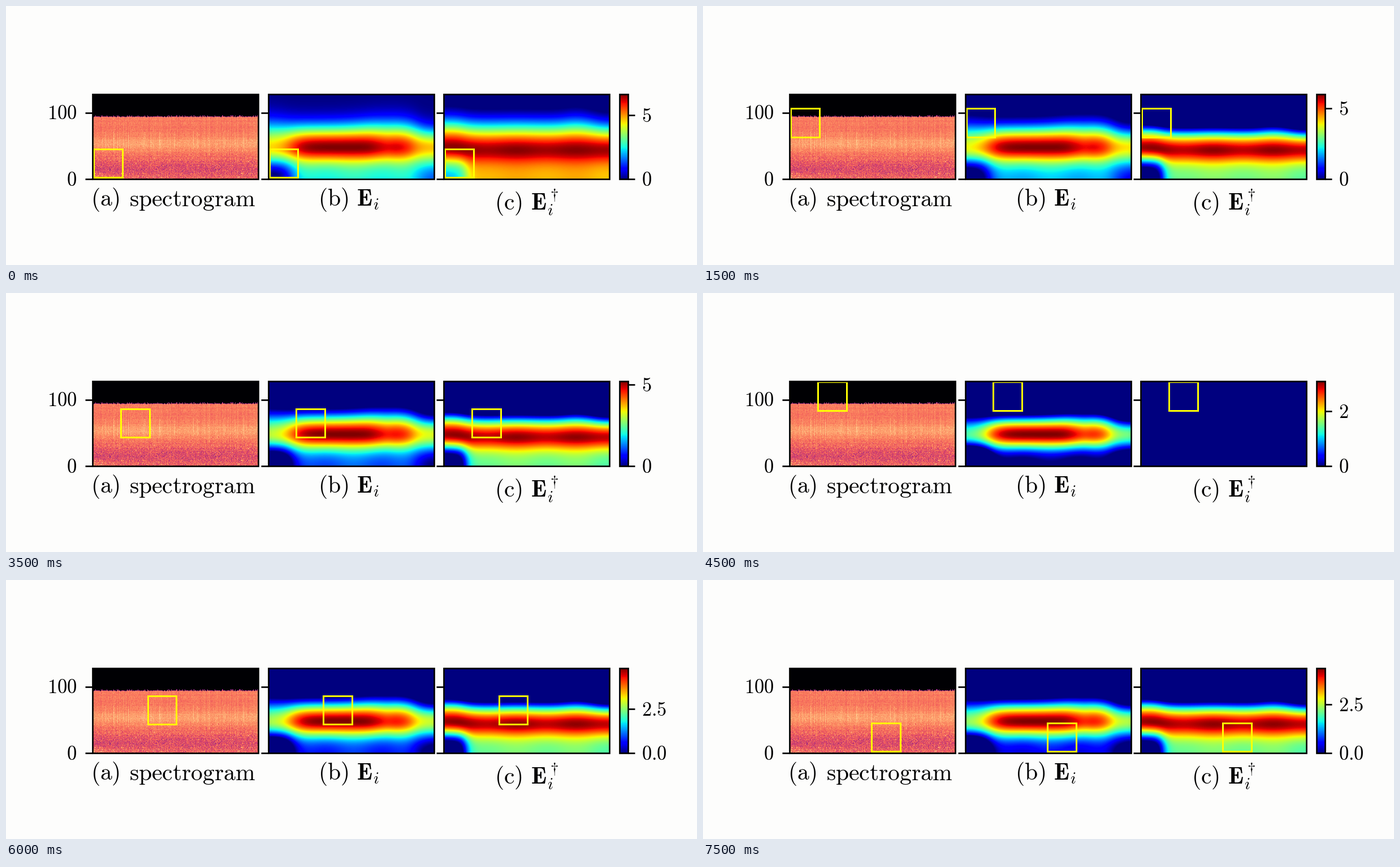
Animation, 1222 px wide and 458 px high, one loop 8 s. Source, as a matplotlib script:

```python
import matplotlib.pyplot as plt
import numpy as np
from matplotlib.animation import FuncAnimation
from matplotlib.patches import Rectangle

W, H, DPI = 1222, 458, 100
PT = 72 / DPI
LEFTS = (153, 463.5, 774)
PW, TOP, BOTTOM = 293, 156, 306
BAR_X, BAR_W = 1085.3, 15
STEPS, ROWS = 16, 5
TICK_PX, CAPTION_PX = 34.6, 41.5

plt.rcParams["mathtext.fontset"] = "cm"

u = (np.arange(PW) + .5) / PW
y = np.arange(TOP, BOTTOM)[:, None] + .5


def after(x, x0, w):
    """Soft step from 0 to 1 at x0."""
    return 1 / (1 + np.exp((x0 - x) / w))


def before(x, x0, w):
    return 1 - after(x, x0, w)


def bump(x, x0, w):
    return np.exp(-((x - x0) / w) ** 2 / 2)


def band(centre, ridge, above, below, spread_up, spread_down):
    """Horizontal ridge falling off to a plateau on either side."""
    plateau = np.where(y < centre, above, below)
    spread = np.where(y < centre, spread_up, spread_down)
    return plateau + (ridge - plateau) * bump(y, centre, spread)


def field_b():
    left, right = before(u, .1, .04), after(u, .91, .025)
    ridge = (1 - .58 * before(u, .14, .04) - .12 * after(u, .64, .025)
             - .4 * after(u, .87, .03) - .03 * bump(u, .72, .03))
    below = (-.06 - .85 * before(u, .13, .035) - .32 * after(u, .9, .035)
             - .03 * np.cos(6 * np.pi * (u - .68)))
    spread_up = 26 + 5 * left - 4 * right + 3 * bump(u, .74, .15)
    return band(250, ridge, -.72, below, spread_up, 18.5 + 5 * left + 3 * right)


def field_c():
    left = before(u, .12, .03)
    wave = np.cos(2 * np.pi * (u - .8) / .36)
    below = .49 - .79 * before(u, .13, .022) - .03 * after(u, .9, .03) + .015 * wave
    spread_up = 33.5 + 1.5 * bump(u, .8, .06) - 3 * after(u, .92, .03)
    return band(255 - 5 * left, .965 + .02 * wave, -1, below, spread_up, 16 + 4 * left)


def spectrogram():
    rng = np.random.default_rng(4)
    r = np.arange(128)[:, None]
    x = np.arange(PW)
    img = .72 + .09 * bump(r, 53, 7) - .12 * bump(r, 15, 10)
    img = img + .1 * before(r, 7, 1) * np.exp(-x / 25)
    img += (.025 + .05 * before(r, 32, 6)) * rng.normal(size=(128, PW))
    img += .012 * rng.normal(size=PW) + .008 * rng.normal(size=(128, 1))
    img[45:72, rng.choice(PW, 14)] += .06
    edge = 95 + (rng.random(PW) > .8) - (rng.random(PW) > .8)
    img[r == edge - 1] = .42
    img[r >= edge] = 0
    return np.clip(img, 0, 1)[::-1]


fig = plt.figure(figsize=(W / DPI, H / DPI), dpi=DPI, facecolor="#fdfdfc")
ax = fig.add_axes([0, 0, 1, 1])
ax.axis("off")


def picture(data, x, w, cmap):
    return ax.imshow(data, cmap=cmap, vmin=0, vmax=1, aspect="auto",
                     extent=(x, x + w, BOTTOM, TOP), interpolation="nearest")


def frame(x, w):
    ax.add_patch(Rectangle((x, TOP), w, BOTTOM - TOP, fill=False, ec="black",
                           lw=2.7 * PT, zorder=4))


def tick(x, y, length):
    return ax.plot([x, x + length], [y, y], color="black", lw=2.7 * PT,
                   solid_capstyle="butt", zorder=4)[0]


def label(x, y, text, px=TICK_PX, ha="left"):
    return ax.text(x, y, f"${text}$", fontsize=px * PT, ha=ha, va="baseline")


def caption(x, y, tag, body_x, body):
    label(x, y, rf"\mathrm{{({tag})}}", CAPTION_PX)
    label(body_x, y, body, CAPTION_PX)


B, C = field_b(), field_c()
picture(spectrogram(), LEFTS[0], PW, "magma")
img_b = picture(B, LEFTS[1], PW, "jet")
img_c = picture(C, LEFTS[2], PW, "jet")
picture(np.linspace(1, 0, 256)[:, None], BAR_X, BAR_W, "jet")

boxes = []
for left in LEFTS:
    frame(left, PW)
    for level in (188.5, BOTTOM):
        tick(left, level, -13)
    box = Rectangle((0, 0), 50.8, 50.3, fill=False, ec="#ffff00", lw=3 * PT, zorder=3)
    boxes.append(ax.add_patch(box))
frame(BAR_X, BAR_W)
tick(BAR_X + BAR_W, BOTTOM, 12)

label(125, 200, "100", ha="right")
label(125, 318, "0", ha="right")
caption(150.5, 353.5, "a", 217.5, r"\mathrm{spectrogram}")
caption(552.5, 353.5, "b", 620.5, r"\mathbf{E}_i")
caption(863.5, 360, "c", 927.5, r"\mathbf{E}_i^\dagger")

bar_tick = tick(BAR_X + BAR_W, TOP, 12)
bar_zero = label(1123.5, 318, "0")
bar_text = label(1123.5, 0, "5")

ax.set_xlim(0, W)
ax.set_ylim(H, 0)


def colour_limit(k):
    return np.interp(k, [0, 1, 3, 5, 7, 9, 10, 12, 15],
                     [6.64, 4.9, 6, 4.03, 5.2, 3.09, 4.2, 4.8, 4.36])


def stretch(data, s):
    """Scale contrast around the peak, cutting off below zero."""
    return np.clip(1 + (data - 1) * s, 0, 1)


def update(k):
    col, row = divmod(k, ROWS)
    vmax = colour_limit(k)
    img_b.set_data(stretch(B, 1.37 - .119 * vmax))
    # The top row of patches gives no response in panel (c).
    img_c.set_data(stretch(C, 1 - .45 * np.exp(-k)) * (row < ROWS - 1))

    for left, box in zip(LEFTS, boxes):
        box.set_xy((left + 2 + 47.8 * col, 252.6 - 23.8 * row))

    step = 2 if vmax <= 4 else 2.5 if vmax <= 5 else 5
    level = BOTTOM - (BOTTOM - TOP) * step / vmax
    bar_tick.set_ydata([level, level])
    bar_text.set_y(level + 12)
    bar_text.set_text(f"${step}$")
    bar_zero.set_text("$0.0$" if step == 2.5 else "$0$")
    return [img_b, img_c, bar_tick, bar_text, bar_zero, *boxes]


anim = FuncAnimation(fig, update, frames=STEPS, interval=500,
                     repeat=True, repeat_delay=0, blit=False)
plt.show()
```
